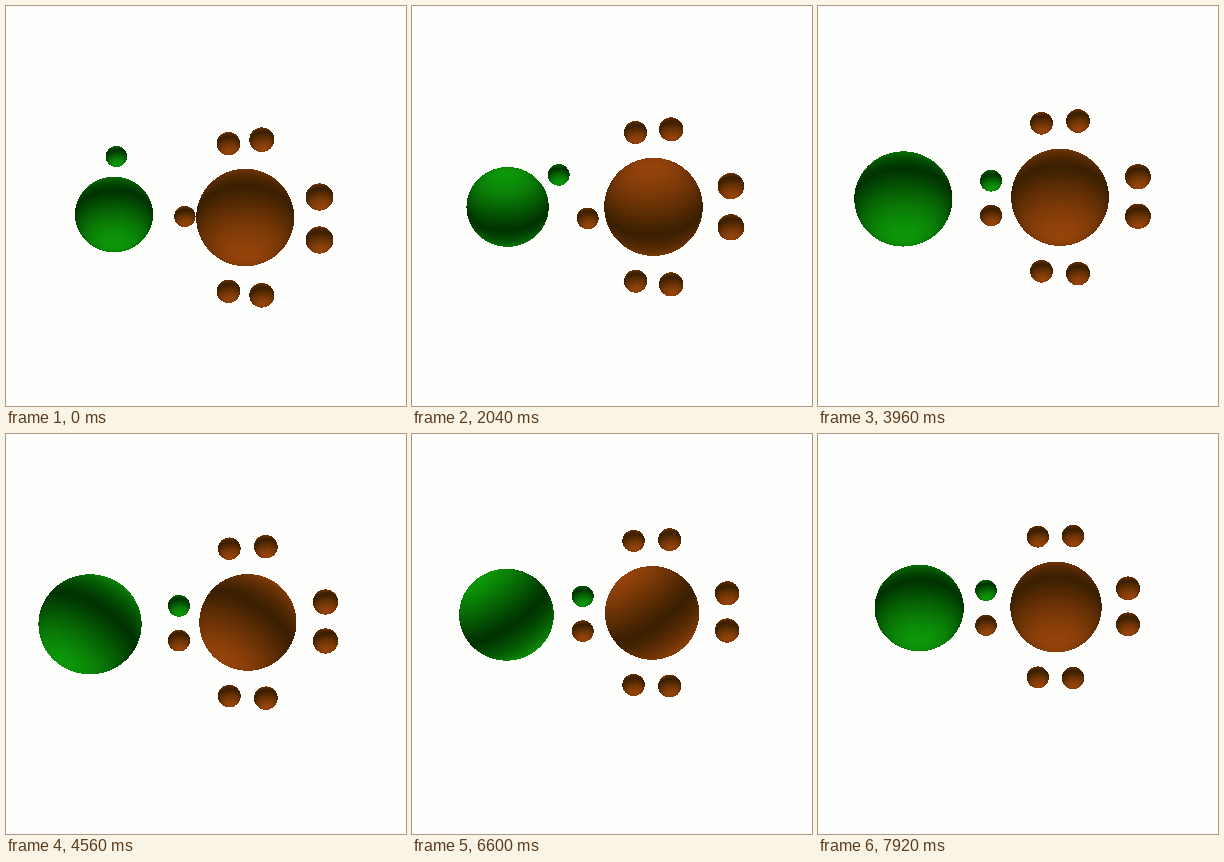
Recreate the animation shown at these times as an HTML page with a canvas. Size 400 px wide and 400 px high, loop 8000 ms.

```html
<!DOCTYPE html>
<html lang="en">
<head>
<meta charset="utf-8">
<title>Two atoms sharing electrons</title>
<style>
  html, body { margin: 0; width: 100%; height: 100%; overflow: hidden; background: #fefefd; }
  canvas { display: block; width: 100vw; height: 100vh; }
</style>
</head>
<body>
<canvas id="stage" width="400" height="400"></canvas>
<script>
const SIZE = 400, LOOP = 8000, STEP = 120, END = 7920;
const BOND = 3120;             // both shared electrons reach their places
const SWELL = [2880, 4400];    // the green atom grows between these times
const LIGHT_TURN = END / 2;

const ctx = document.getElementById('stage').getContext('2d');
const image = ctx.createImageData(SIZE, SIZE);
const pixels = new Uint32Array(image.data.buffer);
const rgb = (r, g, b) => (255 << 24 | b << 16 | g << 8 | r) >>> 0;
const WHITE = rgb(254, 254, 253);
const GREEN = { dark: [0, 50, 0], lit: [13, 150, 9] };
const ORANGE = { dark: [58, 31, 0], lit: [148, 67, 10] };

const mix = (a, b, u) => a + (b - a) * u;

// Straight run from one value to another, bulging by `lift` halfway.
const bow = (from, to, lift = 0) => t => {
  const u = t / END;
  return mix(from, to, u) + 4 * lift * u * (1 - u);
};

// Steady drift that is faster while the green atom swells.
const swell = (start, before, after, end) => t =>
  t < SWELL[0] ? mix(start, before, t / SWELL[0])
  : t < SWELL[1] ? mix(before, after, (t - SWELL[0]) / (SWELL[1] - SWELL[0]))
  : mix(after, end, (t - SWELL[1]) / (END - SWELL[1]));

function turningLight(t) {
  const angle = 2 * Math.PI * t / LIGHT_TURN;
  return [-.62 * Math.sin(angle), .78, .05 + .6 * Math.cos(angle)];
}
const steadyLight = () => [.1, .78, .62];

const atom = (paint, flat, x, y, r) => ({ paint, flat, x, y, r, light: turningLight });
const electron = (paint, x, y, r) => ({ paint, flat: .985, x, y, r, light: steadyLight });

const pair = (x, mid, gap, r) => [-1, 1].map(side =>
  electron(ORANGE, x, t => mid(t) + side * gap(t), r));

const centreY = bow(211.5, 173, -.95);
const bondX = bow(169, 168, 4.6);

// Starts (dx, dy) away from its place in the bond and settles there.
function shared(paint, place, dx, dy, ease) {
  const left = (t, power) => 1 - Math.min(1, t / BOND) ** power;
  return electron(paint,
    t => bondX(t) + dx * left(t, ease),
    t => centreY(t) + place + dy * left(t, 1),
    bow(10.7, 10.8, .3));
}

const spheres = [
  atom(GREEN, .97, swell(108, 90.5, 83.2, 101.2), bow(208.5, 174, 1.7), swell(39, 42, 51.9, 44.6)),
  atom(ORANGE, .995, bow(239.2, 238, 3.4), centreY, bow(49, 45.7, 1.5)),
  shared(GREEN, -16.6, -58.7, -44.4, 1.35),
  shared(ORANGE, 18.2, 9.8, -19.2, 1),
  ...pair(bow(222.4, 219.8, 2.4), centreY, bow(73.8, 70.4, 1.9), bow(11.8, 11.1)),
  ...pair(bow(255.8, 255, 4.6), centreY, bow(77.8, 71, 1.9), bow(12.5, 11.4)),
  ...pair(bow(313.5, 310, 8.2), bow(212.5, 172.3, -1.9), bow(21.5, 18), bow(13.8, 12))
];

// The light works on both faces, so each sphere shows a dark band where it grazes.
function drawSphere({ paint, flat, x, y, r, light }, t) {
  const cx = x(t), cy = y(t), rx = r(t), ry = rx * flat;
  const [lx, ly, lz] = light(t), length = Math.hypot(lx, ly, lz);
  for (let py = Math.floor(cy - ry); py <= cy + ry; py++) {
    for (let px = Math.floor(cx - rx); px <= cx + rx; px++) {
      const nx = (px + .5 - cx) / rx, ny = (py + .5 - cy) / ry;
      const rest = 1 - nx * nx - ny * ny;
      if (rest < 0) continue;
      const dot = nx * lx + ny * ly + Math.sqrt(rest) * lz;
      const glow = (Math.abs(dot) / length) ** 1.2;
      pixels[py * SIZE + px] = rgb(...paint.dark.map((c, i) => Math.round(mix(c, paint.lit[i], glow))));
    }
  }
}

let shown = -1;
function frame() {
  const t = Math.floor(performance.now() % LOOP / STEP) * STEP;
  if (t !== shown) {
    shown = t;
    pixels.fill(WHITE);
    spheres.forEach(sphere => drawSphere(sphere, t));
    ctx.putImageData(image, 0, 0);
  }
  requestAnimationFrame(frame);
}
frame();
</script>
</body>
</html>
```
